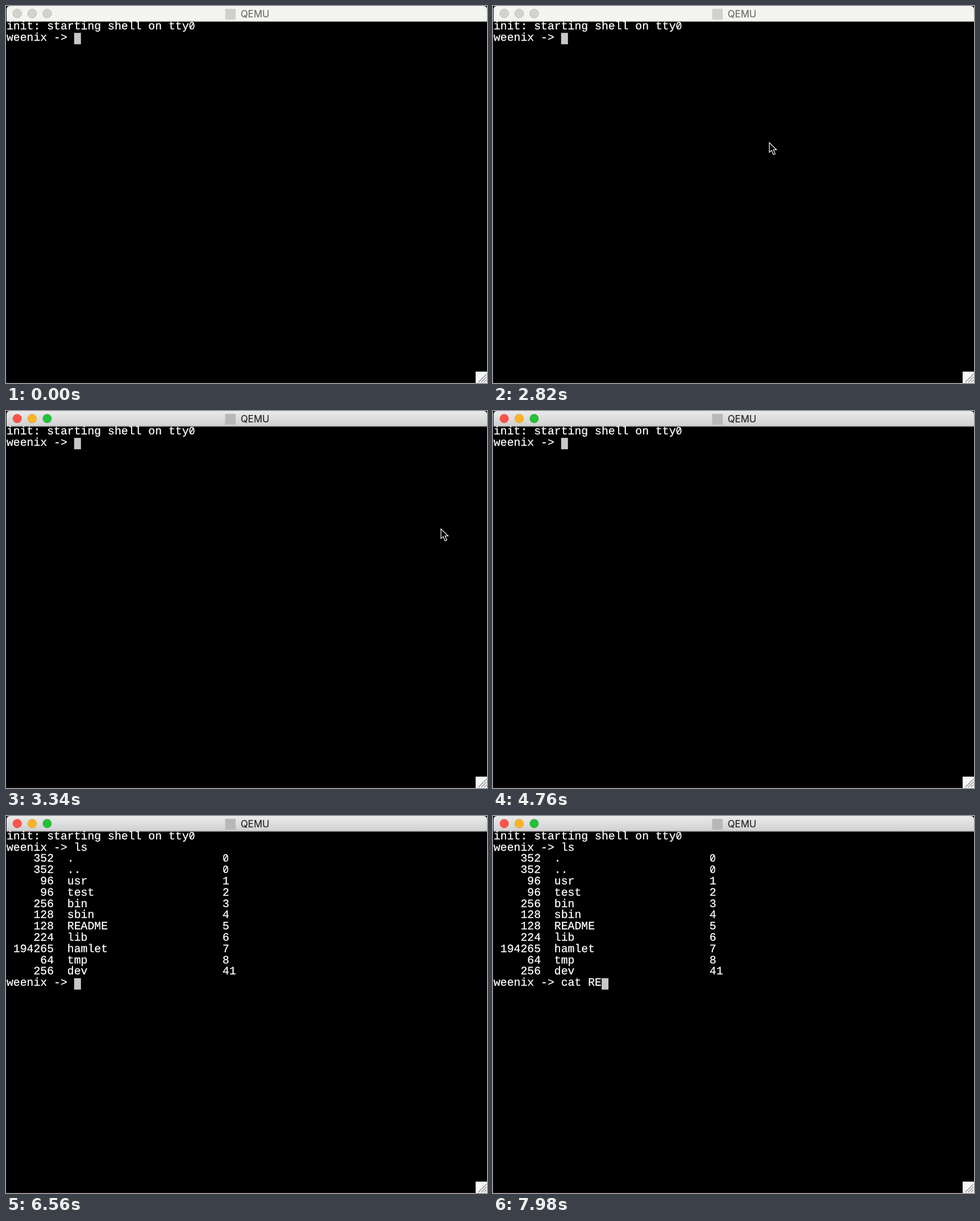
An HTML page that plays this animation: 846x662 px, repeating every 8000 ms.

```html
<!DOCTYPE html>
<html lang="en">
<head>
<meta charset="utf-8">
<title>QEMU</title>
<style>
  html, body { margin: 0; width: 100%; height: 100%; overflow: hidden; background: #000; }
  svg { position: absolute; left: 0; top: 0; }
  pre {
    position: absolute; left: 1px; top: 26.8px; margin: 0; color: #fff;
    font: 19.8px/19.8px "Liberation Mono", monospace;
    text-rendering: geometricPrecision;
    -webkit-text-stroke: .3px #fff;
  }
  pre i { font: 18px/0 "Noto Sans Mono", monospace; letter-spacing: 1.08px; }
  .bar { fill: #f4f4f1; }
  .edge { fill: #dededa; }
  .light { fill: #d2d2d0; stroke: #bfbfbd; }
  .title { font: 16.7px Inter, sans-serif; fill: #6c6c6c; stroke: #6c6c6c; stroke-width: .2; }
  .icon { fill: #d0d0ce; }
  .active .bar { fill: url(#metal); }
  .active .edge { fill: #a6a6a4; }
  .active .light { fill: var(--on); stroke: #0002; }
  .active .title { fill: #262626; stroke: #262626; }
  .active .icon { fill: #b8b8b8; }
</style>
</head>
<body>
<svg width="846" height="662" viewBox="0 0 846 662">
  <defs>
    <linearGradient id="metal" x2="0" y2="1">
      <stop stop-color="#ebebeb"/>
      <stop offset="1" stop-color="#d0d0d0"/>
    </linearGradient>
  </defs>
  <path d="M0 28H1V662H0Z" fill="#0a1526"/>
  <path d="M1 660H826V662H1Z" fill="#10060a"/>
  <g id="frame">
    <path class="bar" d="M1 27V6Q1 0 7 0H840Q846 0 846 6V27Z"/>
    <path class="edge" d="M1 26H846V27.4H1Z"/>
    <circle class="light" cx="19.7" cy="13.2" r="7.8" style="--on:#ff5249"/>
    <circle class="light" cx="46" cy="13.2" r="7.8" style="--on:#fdb424"/>
    <circle class="light" cx="72.4" cy="13.2" r="7.8" style="--on:#23c137"/>
    <rect class="icon" x="385.5" y="5" width="18.5" height="19"/>
    <text class="title" x="438" y="20" text-anchor="middle">QEMU</text>
  </g>
  <path d="M826 642H846V662H826Z" fill="#f6f6f6"/>
  <path d="M831 660.5L845 646.5M836 660.5L845 651.5M841 660.5L845 656.5" stroke="#8c8c8c" stroke-width="1.3"/>
  <rect id="cursor" width="12" height="20" fill="#c8c8c8"/>
</svg>
<pre id="screen"></pre>
<svg width="846" height="662" viewBox="0 0 846 662">
  <path id="pointer" d="M0 0V17L4 13.4L7.2 21L10.3 19.7L7.2 12.3H12.6Z" fill="#000" stroke="#fff" stroke-width="1.2"/>
</svg>
<script>
const LOOP = 8000, CELL = 11.88, ROW = 19.8;
const PROMPT = 'weenix -> ';
const $ = id => document.getElementById(id);
const frame = $('frame'), cursor = $('cursor'), screen_ = $('screen'), pointer = $('pointer');

const entry = ([size, name, node]) =>
  String(size).padStart(7) + '  ' + name.padEnd(23) + node + '\n';
const files = [
  [352, '.', 0], [352, '..', 0], [96, 'usr', 1], [96, 'test', 2],
  [256, 'bin', 3], [128, 'sbin', 4], [128, 'README', 5], [224, 'lib', 6],
  [194265, 'hamlet', 7], [64, 'tmp', 8], [256, 'dev', 41]
];
const list = (from, to) => files.slice(from, to).map(entry).join('');

// [time, text printed]
const output = [
  [0, 'init: starting shell on tty0\n' + PROMPT],
  [4980, 'l'], [5100, 's'], [5240, '\n'],
  [5660, list(0, 3)], [5680, list(3, 7)], [5700, list(7) + PROMPT],
  [7180, 'c'], [7300, 'a'], [7420, 't'], [7560, ' '], [7820, 'R'], [7960, 'E']
];

// [time, x, y] of the pointer tip
const path = [[2800, 486, 240], [3020, 486, 240], [3340, 765, 207], [3540, 766, 207], [3640, 848, 200]];
const ACTIVATE = 3020;

function movePointer(t) {
  const i = path.findIndex(p => p[0] > t);
  pointer.style.display = i > 0 ? '' : 'none';
  if (i < 1) return;
  const [t0, x0, y0] = path[i - 1], [t1, x1, y1] = path[i];
  const u = (t - t0) / (t1 - t0), k = u * u * (3 - 2 * u);
  pointer.setAttribute('transform', `translate(${x0 + (x1 - x0) * k} ${y0 + (y1 - y0) * k})`);
}

let shown = '';
function print(t) {
  const text = output.filter(o => o[0] <= t).map(o => o[1]).join('');
  if (text === shown) return;
  shown = text;
  screen_.innerHTML = text.replace(/>/g, '&gt;').replace(/0/g, '<i>0</i>');
  const lines = text.split('\n'), row = lines.length - 1;
  cursor.setAttribute('x', 1 + lines[row].length * CELL);
  cursor.setAttribute('y', 27.4 + row * ROW);
}

function draw(now) {
  const t = now % LOOP;
  frame.classList.toggle('active', t >= ACTIVATE);
  print(t);
  movePointer(t);
  requestAnimationFrame(draw);
}
draw(performance.now());
</script>
</body>
</html>
```
